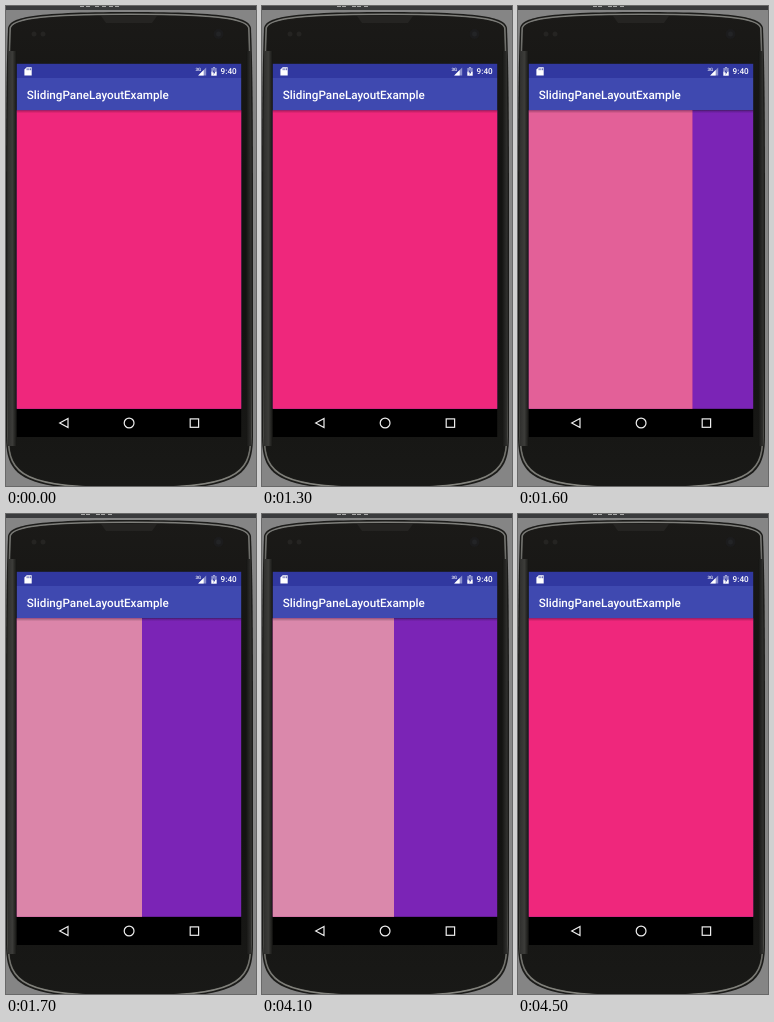
Animation of 250 by 480 pixels, one loop 5000 ms. Source, as an HTML page with a canvas:

```html
<!DOCTYPE html>
<html lang="en">
<head>
<meta charset="utf-8">
<title>Sliding pane</title>
<style>
html, body { margin: 0; width: 100%; height: 100%; overflow: hidden; background: #777; }
canvas { display: block; }
</style>
</head>
<body>
<canvas id="stage" width="250" height="480"></canvas>
<script>
const ctx = document.getElementById('stage').getContext('2d');
ctx.textRendering = 'geometricPrecision';
const LOOP = 5000, STEP = 100;
const LEFT = 10.8, RIGHT = 235.2, TOP = 104.3, BOTTOM = 402.8, OPEN = 95.3;

// [ms, x of the sliding edge]
const edgeKeys = [
  [0, RIGHT], [1400, RIGHT], [1500, 212.8], [1700, 136], [1800, 132], [2000, 130],
  [2100, 105], [2200, OPEN], [4000, OPEN], [4100, 132], [4200, 168],
  [4300, 201], [4400, 225], [4500, RIGHT], [LOOP, RIGHT]
];

function edgeAt(t) {
  const i = edgeKeys.findIndex(k => k[0] > t);
  const [t0, x0] = edgeKeys[i - 1], [t1, x1] = edgeKeys[i];
  return x0 + (x1 - x0) * (t - t0) / (t1 - t0);
}

function rect(x, y, w, h, fill) {
  ctx.fillStyle = fill;
  ctx.fillRect(x, y, w, h);
}

function poly(points, fill, stroke, width = 1) {
  ctx.beginPath();
  points.forEach(([x, y]) => ctx.lineTo(x, y));
  ctx.closePath();
  if (fill) { ctx.fillStyle = fill; ctx.fill(); }
  if (stroke) { ctx.strokeStyle = stroke; ctx.lineWidth = width; ctx.stroke(); }
}

function disc(x, y, r, fill) {
  ctx.beginPath();
  ctx.arc(x, y, r, 0, Math.PI * 2);
  ctx.fillStyle = fill;
  ctx.fill();
}

function label(text, x, y, font) {
  ctx.font = font + ' Roboto, sans-serif';
  ctx.fillStyle = '#fff';
  ctx.fillText(text, x, y);
}

function gradient(x0, y0, x1, y1, ...colors) {
  const g = ctx.createLinearGradient(x0, y0, x1, y1);
  colors.forEach((c, i) => g.addColorStop(i / (colors.length - 1), c));
  return g;
}

// Phone outline, shrunk by d on every side
function outline(d) {
  const l = d, r = 247 - d, t = 6 + d, b = 484 - d;
  ctx.beginPath();
  ctx.moveTo(l, 240);
  ctx.bezierCurveTo(l, 130, l, 70, l + 2, 22);
  ctx.bezierCurveTo(l + 4, t + 6, l + 22, t, 123.5, t);
  ctx.bezierCurveTo(r - 22, t, r - 4, t + 6, r - 2, 22);
  ctx.bezierCurveTo(r, 70, r, 130, r, 240);
  ctx.lineTo(r, 430);
  ctx.bezierCurveTo(r, b - 12, r - 16, b, 123.5, b);
  ctx.bezierCurveTo(l + 16, b, l, b - 12, l, 430);
  ctx.closePath();
}

function rim(d, width, stroke) {
  outline(d);
  ctx.lineWidth = width;
  ctx.strokeStyle = stroke;
  ctx.stroke();
}

function drawBody(t) {
  rect(0, 0, 250, 480, '#858585');
  rect(0, 0, 250, 4, '#3a3b3d');

  // Lower edge of the cropped caption
  const marks = t < 1300 ? [74, 80, 89, 96, 103, 109] : [75, 80, 90, 95, 102];
  marks.forEach(x => rect(x, 0, 4, 1, '#aaa'));

  outline(0);
  ctx.fillStyle = '#1c1c1a';
  ctx.fill();
  rim(2.2, 1.6, gradient(0, 6, 0, 480, '#80807c', '#3c3c39', '#30302e', '#3c3c39', '#85857f'));
  outline(3.5);
  ctx.fillStyle = gradient(0, 6, 0, 480, '#1b1a18', '#131311', '#131311', '#191917');
  ctx.fill();

  // Soft light on the side bevels
  rect(2, 45, 8.8, 395, gradient(2, 0, 10.8, 0, '#30302e', '#3c3c39', '#141412'));
  rect(240, 45, 5, 395, gradient(240, 0, 245, 0, '#141412', '#30302e'));

  poly([[95, 10], [151, 10], [146, 17], [100, 17]], '#252422');
  disc(28, 28, 2.5, '#252422');
  disc(37, 28, 2.5, '#252422');
  disc(212.5, 28, 5, '#1c1c1d');
  disc(212.5, 28, 2.5, '#232426');
}

function drawBars() {
  const w = RIGHT - LEFT;
  rect(LEFT, 57.8, w, 14.2, '#3138a0');
  rect(LEFT, 72, w, TOP - 72, '#3f49b0');
  label('SlidingPaneLayoutExample', 20.8, 93.2, '500 11.67px');
  label('9:40', 214.6, 68.4, '500 8.17px');

  // Memory card
  poly([[20.7, 61.2], [25.7, 61.2], [25.7, 69.6], [18.4, 69.6], [18.4, 63.5]], '#fff');
  for (const x of [20.7, 22.5, 24.3]) rect(x, 62.3, 0.8, 1.9, '#3138a0');

  // Signal
  label('3G', 189.5, 65.3, '500 4.5px');
  poly([[200.2, 61.5], [200.2, 69.5], [192.2, 69.5]], '#8b90cc');
  poly([[197.7, 64], [197.7, 69.5], [192.2, 69.5]], '#fff');

  // Battery
  rect(206.9, 61, 2.2, 1.2, '#a4a8d6');
  rect(205.3, 62, 5.4, 3.5, '#8b90cc');
  rect(205.3, 65.5, 5.4, 4.2, '#fff');
  poly([[208.5, 63], [206.5, 66.5], [207.9, 66.5], [207.5, 69], [209.5, 65.6], [208.2, 65.6]], '#3138a0');

  rect(LEFT, BOTTOM, w, 431 - BOTTOM, '#000');
  poly([[53.7, 417], [62, 412.4], [62, 421.6]], null, '#eee', 1.2);
  ctx.beginPath();
  ctx.arc(123.1, 417, 4.9, 0, Math.PI * 2);
  ctx.stroke();
  ctx.strokeRect(184.2, 412.9, 8.4, 8.4);
}

function drawPanes(t) {
  const x = edgeAt(t);
  const slide = (RIGHT - x) / (RIGHT - OPEN);
  const h = BOTTOM - TOP;
  rect(LEFT, TOP, RIGHT - LEFT, h, '#7b24b6');
  rect(LEFT, TOP, x - LEFT, h, '#ef277c');
  rect(LEFT, TOP, x - LEFT, h, `rgba(204,204,204,${0.8 * slide})`);
  rect(LEFT, TOP, RIGHT - LEFT, 3, gradient(0, TOP, 0, TOP + 3, 'rgba(0,0,0,.28)', 'rgba(0,0,0,0)'));
}

function frame(now) {
  const t = Math.floor((now % LOOP) / STEP) * STEP;
  drawBody(t);
  drawBars();
  drawPanes(t);
  requestAnimationFrame(frame);
}

requestAnimationFrame(frame);
</script>
</body>
</html>
```
